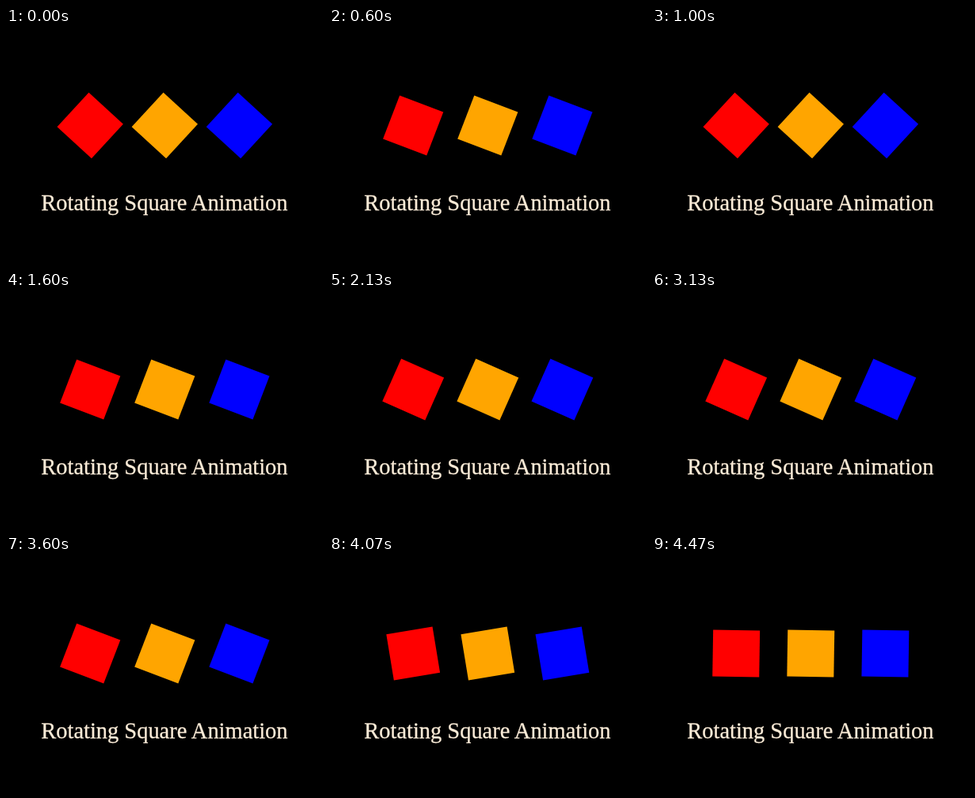
These frames come from a looping animation (400 px wide and 299 px high, 4.54 s). An HTML page:

```html
<!DOCTYPE html>
<html lang="en">
<head>
<meta charset="utf-8">
<title>Rotating Square Animation</title>
<style>
  html, body { margin: 0; width: 100%; height: 100%; overflow: hidden; background: #000; }
  svg { display: block; width: 100%; height: 100%; }
  text {
    font: 28.45px "Liberation Serif", "Times New Roman", serif;
    fill: #faebd7; stroke: #faebd7; stroke-width: .3px; text-anchor: middle;
  }
</style>
</head>
<body>
<svg viewBox="0 0 400 299">
  <defs><rect id="square" x="-29.5" y="-29.5" width="59" height="59"/></defs>
  <use href="#square" fill="#f00"/>
  <use href="#square" fill="#ffa500"/>
  <use href="#square" fill="#00f"/>
  <text x="199.9" y="231">Rotating Square Animation</text>
</svg>
<script>
const LOOP = 4540, STEP = 1000 / 15, START = 569.5;
const squares = document.querySelectorAll('use');

// cubic-bezier(.42, 0, .58, 1), solved by bisection
function easeInOut(x) {
  let low = 0, high = 1, u;
  for (let i = 0; i < 24; i++) {
    u = (low + high) / 2;
    const bx = 1.26 * u * (1 - u) ** 2 + 1.74 * u * u * (1 - u) + u ** 3;
    if (bx < x) low = u; else high = u;
  }
  return u * u * (3 - 2 * u);
}

// One eased turn per second, shown at 15 pictures a second
function draw(now) {
  const tick = Math.floor((now % LOOP + 3.4) / STEP);
  const turn = ((tick * STEP + START) / 1000) % 1;
  const angle = 360 * easeInOut(turn);
  squares.forEach((square, i) =>
    square.setAttribute('transform', `translate(${106.2 + 94.1 * i} 123.5) rotate(${angle})`));
}

let origin;
function loop(now) {
  origin ??= now;
  draw(now - origin);
  requestAnimationFrame(loop);
}
draw(0);
requestAnimationFrame(loop);
</script>
</body>
</html>
```
